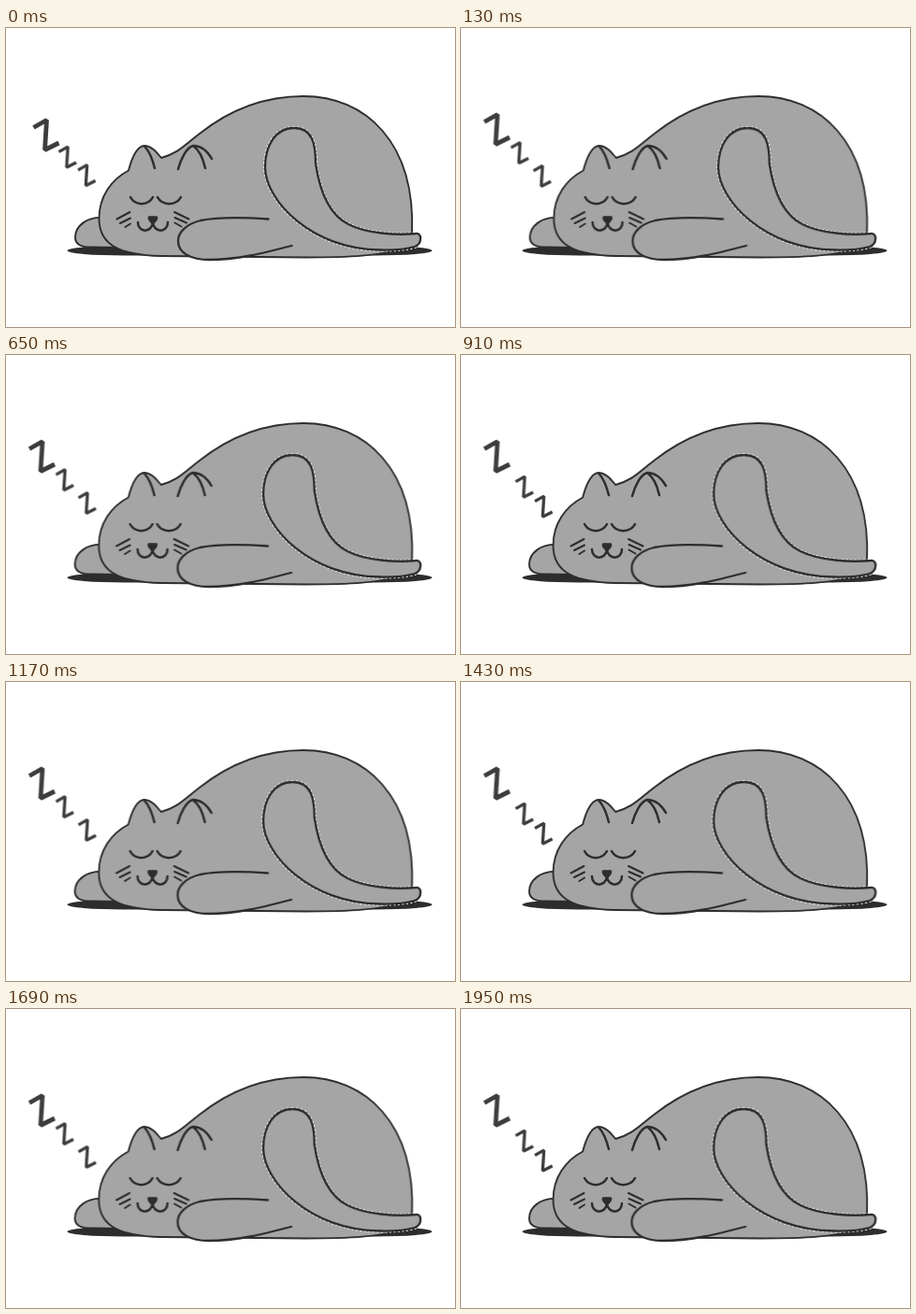
An HTML page for the animation above (2.08 s loop, 480 px wide and 320 px high).

```html
<!DOCTYPE html>
<html lang="en">
<head>
<meta charset="utf-8">
<title>Sleeping cat</title>
<style>
  html, body { margin: 0; width: 100%; height: 100%; overflow: hidden; background: #fff; }
  svg { display: block; width: 480px; height: 320px; }

  .ink { stroke: #2d2d2d; stroke-width: 2.3; stroke-linecap: round; stroke-linejoin: round; fill: none; }
  .fur { fill: #a5a5a5; }
  .solid { fill: #2d2d2d; }
  .body .ink { stroke-width: 1.9; }
  .face { stroke-width: 2.5; }
  .whiskers { stroke-width: 2; }
  .fringe { fill: none; stroke: #fff; stroke-width: 4; stroke-dasharray: 1.8 2.6; }
  .zzz { fill: none; stroke: #3d3d3d; stroke-width: 4.8; stroke-linejoin: bevel; }

  /* Every part steps through four held poses */
  .body, .face, .paw, .tail, .z1, .z2, .z3 { animation: 520ms step-end infinite; }
  .body { animation-name: body; transform-origin: 434px 0; }
  .face { animation-name: face; }
  .paw  { animation-name: paw; }
  .tail { animation-name: tail; transform-origin: 443px 0; }
  .z1 { animation-name: z1; }
  .z2 { animation-name: z2; }
  .z3 { animation-name: z3; }

  @keyframes body {
    0%, 100% { transform: none; }
    25% { transform: scaleX(1.001); }
    50% { transform: scaleX(1.004); }
    75% { transform: scaleX(1.003); }
  }
  @keyframes face {
    0%, 100% { transform: none; }
    25% { transform: translateX(-.4px); }
    50% { transform: translateX(-1.4px); }
    75% { transform: translateX(-1px); }
  }
  @keyframes paw {
    0%, 100% { transform: none; }
    25% { transform: translateX(-.5px); }
    50% { transform: translateX(-2px); }
    75% { transform: translateX(-1.5px); }
  }
  @keyframes tail {
    0%, 100% { transform: none; }
    25% { transform: scaleX(1.012); }
    50% { transform: scaleX(1.053); }
    75% { transform: scaleX(1.042); }
  }
  @keyframes z1 {
    0%, 100% { transform: none; }
    25%, 75% { transform: translate(-4.5px, -6px); }
    50% { transform: translate(-7px, -10px); }
  }
  @keyframes z2 {
    0%, 100% { transform: none; }
    25% { transform: translate(-3px, -4.5px); }
    50% { transform: translate(-1px, -1.5px); }
    75% { transform: translate(2px, 3px); }
  }
  @keyframes z3 {
    0%, 100% { transform: none; }
    25% { transform: translate(.5px, .8px); }
    50% { transform: translate(2px, 5.5px); }
    75% { transform: translate(2px, 4.5px); }
  }
</style>
</head>
<body>
<svg viewBox="0 0 480 320" xmlns="http://www.w3.org/2000/svg">
  <defs>
    <path id="z" d="M0 0L14 -8L12 24L27 16.500"/>
    <path id="tail" d="M308 107C288 107 277 126 277 149C277 184 326 237 400 237.500C418 238 430 236 437 234C445 231 445 219 438 220C418 222 385 220 366 210C344 199 335 172 331 145C331 125 328 107 308 107Z"/>
  </defs>

  <rect class="solid" x="65.500" y="233" width="390" height="10.500" rx="60" ry="5.250"/>

  <g class="body">
    <path class="ink fur" d="M104 203C86 202 74 212 74 224C74 232 80 234.500 90 234.500L120 235Z"/>
    <path class="ink fur" d="M166 139C184 134 190 126 207 113C236 90 274 73 318 73C384 73 438 122 434 220L434 232C405 245 360 245.500 320 245.500L165 244C125 243 99.500 234 99.500 204C99.500 180 113 162 131 152.500C134 141 139 127 147.500 126C156 126 161 133 166 139Z"/>
  </g>

  <g class="face ink">
    <path d="M148.500 127C154 133 157 142 159 150"/>
    <path d="M184 151C187 140 193 128 200 126C209 126 216 133 220 140M200 126C207 131 211 141 213 150"/>
    <path d="M133 181C138 190.500 152 190.500 157 181M162 181C167 190.500 182 190.500 187 181"/>
    <path d="M141 208C141 219.500 156 219.500 157 208C158 219.500 173 219.500 173 208"/>
    <path class="solid" d="M153 202.500H161Q162 204.500 157 209Q152 204.500 153 202.500Z"/>
    <path class="whiskers" d="M118.500 204.500L132.500 197M122 209L133 203.500M127.500 213L133 209.500M180 197L195.500 204.500M180.500 203L193 208.500M180.500 208.500L187.500 212.500"/>
  </g>

  <path class="paw ink fur" d="M280.500 204.500C252 202.500 225 202.500 208 206C192 210 184 219 184 228C184 241 198 248 217 248C248 248 275 241 305.500 233"/>

  <g class="tail">
    <use href="#tail" class="fringe"/>
    <use href="#tail" class="ink fur"/>
  </g>

  <g class="zzz">
    <g class="z1"><use href="#z" transform="translate(29.500 106.500)"/></g>
    <g class="z2"><use href="#z" transform="translate(56.500 132.500) scale(.69)"/></g>
    <g class="z3"><use href="#z" transform="translate(77 152) scale(.69)"/></g>
  </g>
</svg>
</body>
</html>
```
